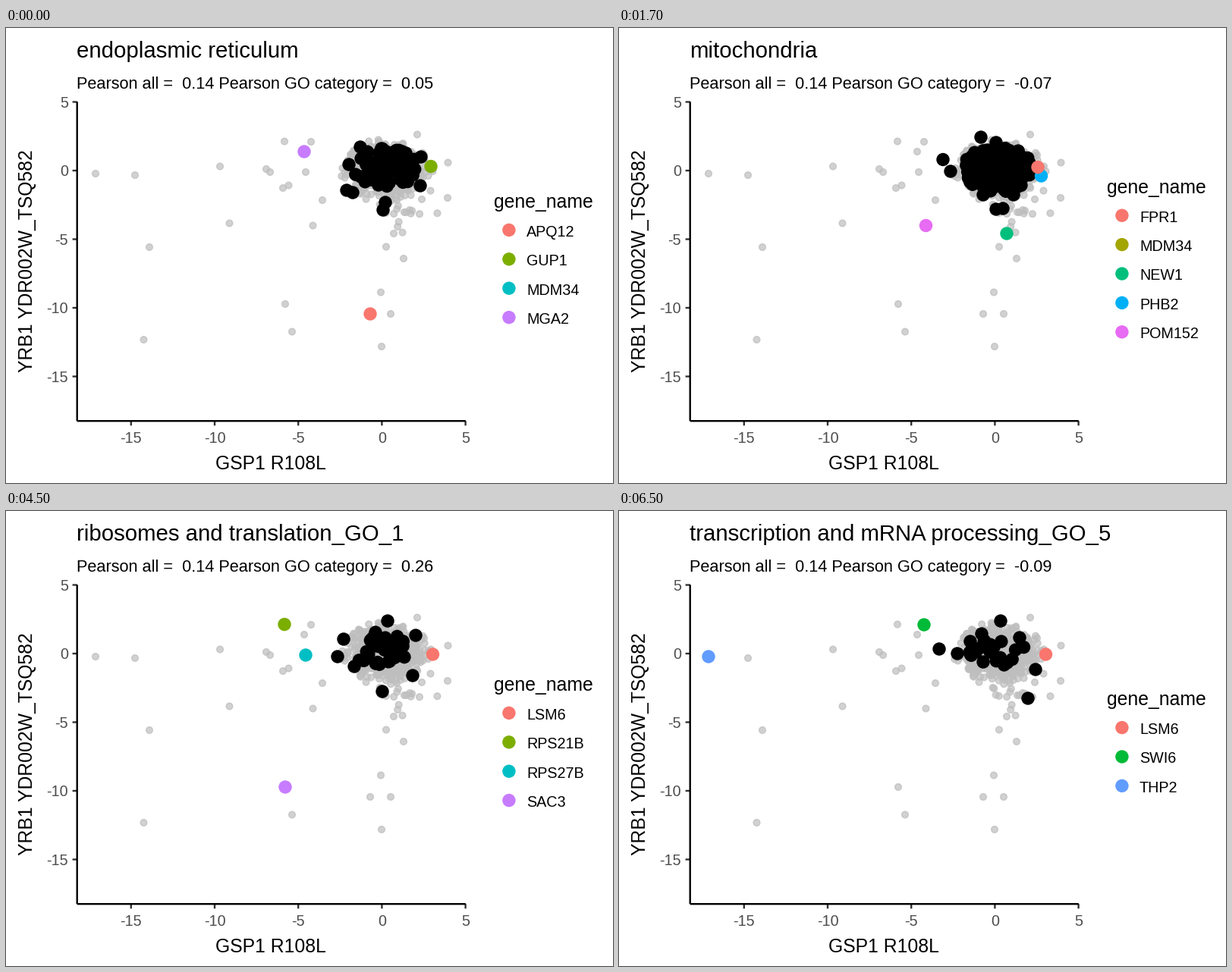
A matplotlib script for the animation above (8 s loop, 800x600 px).

```python
import numpy as np
import matplotlib.pyplot as plt
from matplotlib.animation import FuncAnimation
from matplotlib.collections import PatchCollection
from matplotlib.patches import Circle

W, H, DPI = 800, 600, 100
PT = 72 / DPI  # points per pixel
STEP_MS = 500

plt.rcParams.update({
    "font.family": "Liberation Sans",
    "text.hinting": "force_autohint",
    "text.hinting_factor": 8,
})

LEFT, BOTTOM = 93.7, 518.2
TITLE, SUBTITLE, LABEL, SMALL = 29.33, 21.75, 24.75, 19.75
BIG_DOT, SMALL_DOT, DOT_STROKE = 8.7, 4.3, 1.57

# genes: name -> spot on the stage (None: hidden); core: centre, radii, count
SCENES = [
    dict(title="endoplasmic reticulum", score="0.05",
         genes={"APQ12": (480, 377), "GUP1": (560, 182.5), "MDM34": None,
                "MGA2": (393, 163)},
         core=(500, 184, 42, 26, 80),
         edge=[(449, 214), (457, 217), (497, 240), (500, 230), (547, 170),
               (546, 208), (452, 180), (467, 157)]),
    dict(title="mitochondria", score="-0.07",
         genes={"FPR1": (552, 183.5), "MDM34": None, "NEW1": (511, 271),
                "PHB2": (556.5, 195), "POM152": (404.5, 260.5)},
         core=(500, 186, 47, 30, 150),
         edge=[(427, 173.5), (437, 189), (477, 144), (497, 151), (497, 239),
               (506, 238), (520, 220), (480, 220)]),
    dict(title="chromatin organization_GO_2", score="0.22",
         genes={"DPB4": (365, 211), "ESC2": None, "NUP133": (294.5, 257.5),
                "SEM1": (170, 194)},
         core=(502, 187, 30, 18, 24),
         edge=[(445, 179), (464, 203.5), (520, 158), (540, 185.5), (474, 228),
               (510, 233), (532.5, 256), (538, 212)]),
    dict(title="ribosomes and translation_GO_1", score="0.26",
         genes={"LSM6": (562.5, 189), "RPS21B": (367, 149.5),
                "RPS27B": (395, 190), "SAC3": (368, 364)},
         core=(498, 184, 42, 21, 28),
         edge=[(445, 169), (437, 192), (459, 205), (487, 160), (503, 145),
               (540, 164), (536, 217), (496, 238)]),
    dict(title="transcription and mRNA processing_GO_5", score="-0.09",
         genes={"LSM6": (562.5, 189), "SWI6": (402, 150), "THP2": (118, 192)},
         core=(500, 186, 38, 18, 22),
         edge=[(422, 182), (446, 188), (463, 172), (478, 162), (503, 145),
               (539, 247), (549, 209), (528, 167)]),
]

FAR_POINTS = [
    (189, 289), (181.5, 411), (282, 182.5), (343, 186), (348, 190), (372.5, 207.5),
    (377, 400.5), (494, 348.5), (507, 377), (495, 420), (501, 288.5), (524, 304),
    (417, 227), (582, 224), (582.5, 177.5), (542, 140.5),
]

fig = plt.figure(figsize=(W / DPI, H / DPI), dpi=DPI, facecolor="white")
ax = fig.add_axes([0, 0, 1, 1])
ax.set(xlim=(0, W), ylim=(H, 0))
ax.axis("off")


def hue_palette(n):
    """Evenly spaced CIELUV hues at lightness 65 and chroma 100, as sRGB."""
    light, chroma = 65, 100
    hue = np.radians(15 + 360 * np.arange(n) / n)
    u = chroma * np.cos(hue) / (13 * light) + 0.19784
    v = chroma * np.sin(hue) / (13 * light) + 0.46834
    y = np.full(n, ((light + 16) / 116) ** 3)
    x = y * 9 * u / (4 * v)
    z = y * (12 - 3 * u - 20 * v) / (4 * v)
    to_rgb = np.array([[3.2405, -1.5371, -0.4985],
                       [-0.9693, 1.8760, 0.0416],
                       [0.0556, -0.2040, 1.0572]])
    linear = np.clip(to_rgb @ [x, y, z], 0, 1).T
    return np.where(linear > 0.00304, 1.055 * linear ** (1 / 2.4) - 0.055,
                    12.92 * linear)


def text(x, y, label, size, color="black", **kw):
    return ax.text(x, y, label, fontsize=size * PT, color=color, va="baseline", **kw)


def line(x0, y0, x1, y1, color="black"):
    ax.plot([x0, x1], [y0, y1], color=color, lw=2.37 * PT,
            solid_capstyle="butt", snap=False)


def dots(points, radius, colors, zorder, **style):
    circles = [Circle(p, radius) for p in points]
    return ax.add_collection(
        PatchCollection(circles, facecolors=colors, zorder=zorder, **style))


def uniform_ellipse(seed, cx, cy, rx, ry, n):
    rng = np.random.default_rng(seed)
    r, a = np.sqrt(rng.random(n)), rng.uniform(0, 2 * np.pi, n)
    return np.column_stack([cx + rx * r * np.cos(a), cy + ry * r * np.sin(a)])


def gaussian(seed, center, spread, n, limit=2.7):
    z = np.random.default_rng(seed).normal(size=(n, 2))
    z = z[np.hypot(*z.T) < limit]
    return np.array(center) + z * spread


def draw_background():
    spots = {s for scene in SCENES for s in scene["genes"].values() if s}
    grey = np.vstack([
        gaussian(1, (499, 186), (23, 15), 700),
        gaussian(2, (512, 211), (20, 13), 60),
        gaussian(3, (522, 248), (24, 14), 16, limit=2),
        sorted(spots), FAR_POINTS,
    ])
    dots(grey, SMALL_DOT, "#BEBEBE", 2.5, edgecolors="#BEBEBE",
         linewidths=DOT_STROKE * PT, alpha=0.7)


def draw_axes():
    for v in range(-15, 6, 5):
        x, y = 495.4 + 22.04 * v, 188 - 18.1 * v
        line(x, BOTTOM, x, BOTTOM + 6.1, "#333333")
        line(LEFT - 6.1, y, LEFT, y, "#333333")
        text(x, 547, str(v), SMALL, "#4D4D4D", ha="center")
        text(82, round(y + 7.2), str(v), SMALL, "#4D4D4D", ha="right")
    line(LEFT, 97.3, LEFT, BOTTOM)
    line(LEFT, BOTTOM, 605.8, BOTTOM)
    text(348.5, 582, "GSP1 R108L", LABEL, ha="center")
    text(35, 307, "YRB1 YDR002W_TSQ582", LABEL, ha="center",
         rotation=90, rotation_mode="anchor")


def draw_scene(seed, scene):
    genes = scene["genes"]
    palette = hue_palette(len(genes))
    black = np.vstack([scene["edge"], uniform_ellipse(seed, *scene["core"])])
    keys = [(662.9, 324 + 38.4 * (i - (len(genes) - 1) / 2))
            for i in range(len(genes))]
    # Reversed so that earlier genes lie on top.
    shown = [(s, c) for s, c in zip(genes.values(), palette) if s][::-1]
    spots, spot_colors = zip(*shown)

    items = [
        text(93, 39, scene["title"], TITLE),
        text(93, 80, f"Pearson all =  0.14 Pearson GO category =  {scene['score']}",
             SUBTITLE),
        text(643, round(keys[0][1] - 29.4), "gene_name", LABEL),
        dots(black, BIG_DOT, "black", 3),
        dots(spots, BIG_DOT, spot_colors, 4),
        dots(keys, BIG_DOT, palette, 4),
    ]
    items += [text(686, round(y + 8.4), name, SMALL)
              for name, (_, y) in zip(genes, keys)]
    return items


draw_background()
draw_axes()
groups = [draw_scene(i, scene) for i, scene in enumerate(SCENES)]


def update(n):
    current = (n * STEP_MS + 1500) // 2000
    for i, group in enumerate(groups):
        for item in group:
            item.set_visible(i == current)
    return []


anim = FuncAnimation(fig, update, frames=16, interval=STEP_MS, repeat=True,
                     repeat_delay=0, blit=False)
plt.show()
```
